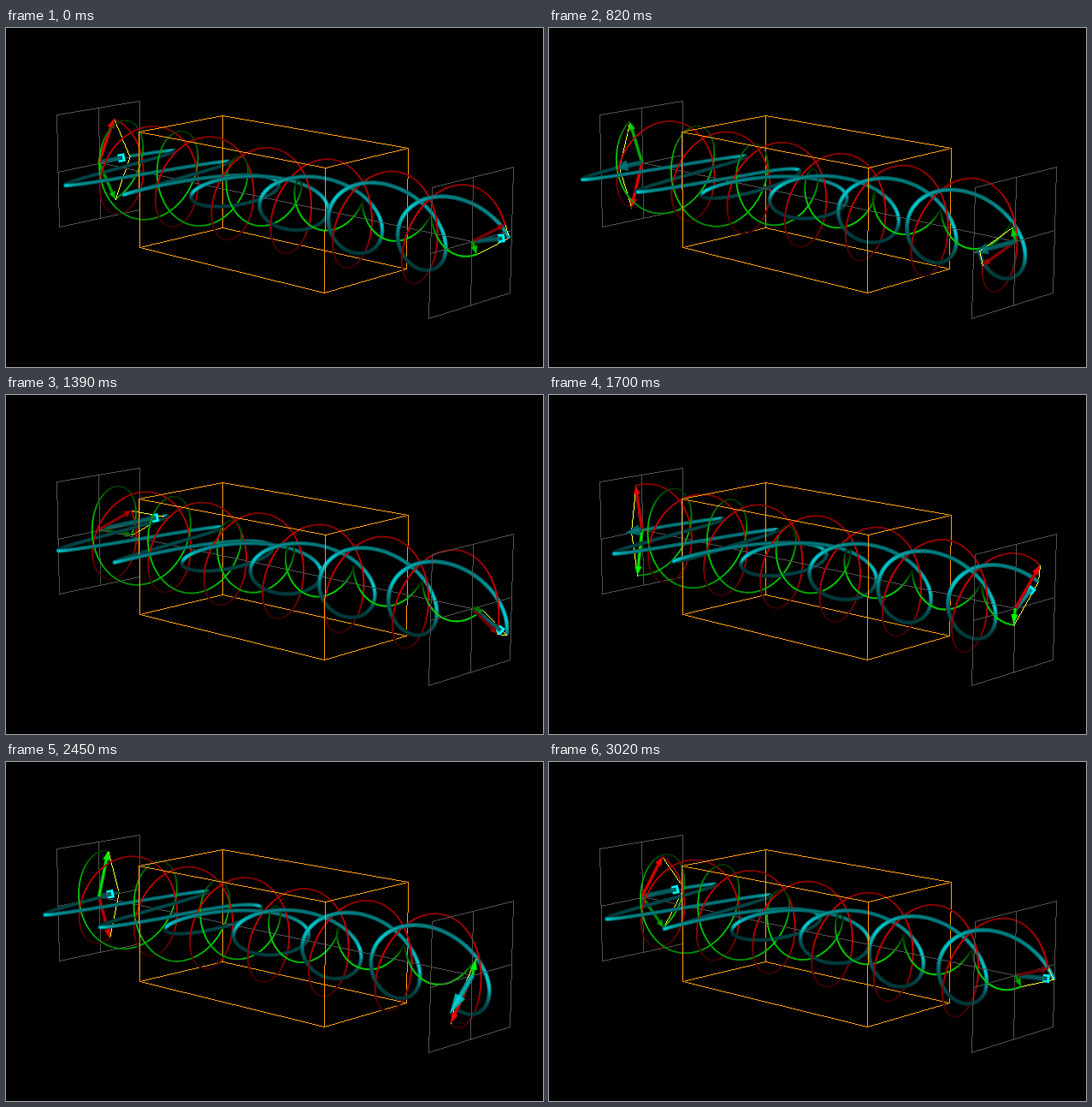
Animation of 628x396 px, one loop 3080 ms. Source, as an HTML page with a canvas:

```html
<!DOCTYPE html>
<html lang="en">
<head>
<meta charset="utf-8">
<title>Circular waves in an absorbing medium</title>
<style>
html, body { margin: 0; width: 628px; height: 396px; overflow: hidden; background: #000; }
canvas { display: block; }
</style>
</head>
<body>
<canvas id="stage" width="628" height="396"></canvas>
<script>
const ctx = document.getElementById('stage').getContext('2d');
const rad = Math.PI / 180;

// Camera: yaw and pitch around the centre of the scene.
const sinYaw = Math.sin(47 * rad), cosYaw = Math.cos(47 * rad);
const sinPitch = Math.sin(13.08 * rad), cosPitch = Math.cos(13.08 * rad);
const SCALE = 71.3, DISTANCE = 34.5, CX = 309.6, CY = 199.5;

// Wave: a runs along the axis, u across, v up. The medium fills the middle half.
const HALF = 4.16, BOX = HALF / 2;
const RADIUS = 0.82, DECAY = 1.18, EXTRA = 55 * rad;
const START = 63 * rad, STEP = 20.85 * rad, TURNS = 6;

const RED = [195, 0, 0], GREEN = [0, 200, 0], CYAN = [0, 205, 210];
const GREY = '#505050', ORANGE = '#ff9a10', YELLOW = '#ffff30';

// Pose durations in ms: mostly short, some held.
const holds = Array(35).fill(60);
for (const i of [0, 2, 4, 7, 9, 12, 14, 17, 20, 21, 26, 29]) holds[i] = 130;
holds[32] = 200;
const LOOP = holds.reduce((sum, h) => sum + h, 0);

function project([a, u, v]) {
  const near = a * cosYaw - u * sinYaw;
  const w = 1 - (near * cosPitch + v * sinPitch) / DISTANCE;
  return {
    x: CX + SCALE * (a * sinYaw + u * cosYaw) / w,
    y: CY + SCALE * (near * sinPitch - v * cosPitch) / w,
    w
  };
}

// Headlight shading: bright where the direction lies across the view.
function light([a, u, v]) {
  const dot = a * cosYaw * cosPitch - u * sinYaw * cosPitch + v * sinPitch;
  const len2 = a * a + u * u + v * v || 1;
  return 0.16 + 0.84 * (1 - dot * dot / len2) ** 1.4;
}

const shade = (rgb, k) => `rgb(${rgb.map(c => Math.min(255, Math.round(c * k)))})`;
const minus = (p, q) => p.map((c, i) => c - q[i]);

function line(p, q, color, width, grow = 0) {
  const len = Math.hypot(q.x - p.x, q.y - p.y) || 1;
  const dx = (q.x - p.x) / len * grow, dy = (q.y - p.y) / len * grow;
  ctx.strokeStyle = color;
  ctx.lineWidth = width;
  ctx.beginPath();
  ctx.moveTo(p.x - dx, p.y - dy);
  ctx.lineTo(q.x + dx, q.y + dy);
  ctx.stroke();
}

function polygon(points, color) {
  ctx.fillStyle = color;
  ctx.beginPath();
  for (const [x, y] of points) ctx.lineTo(x, y);
  ctx.fill();
}

// Hard-edged one-pixel line, cut into pieces so that it sorts by depth with the waves.
function wire(p, q, color, items) {
  const n = Math.max(1, Math.round(Math.max(Math.abs(q.x - p.x), Math.abs(q.y - p.y))));
  const mix = (s, e, f) => s + (e - s) * f;
  for (let from = 0; from <= n; from += 6) {
    const to = Math.min(from + 6, n + 1);
    items.push({
      w: mix(p.w, q.w, (from + to) / 2 / n),
      draw() {
        ctx.fillStyle = color;
        for (let i = from; i < to; i++) {
          ctx.fillRect(Math.round(mix(p.x, q.x, i / n)), Math.round(mix(p.y, q.y, i / n)), 1, 1);
        }
      }
    });
  }
}

const frame = [];
const pin = (x, y, a, u, v) => ({ x, y, w: project([a, u, v]).w });
const rod = (p, q, color) => wire(p, q, color, frame);
const ring = (f, color) => f.forEach((p, i) => rod(p, f[(i + 1) % 4], color));
function face(a, [tl, tr, br, bl]) {
  return [pin(...tl, a, -1, 1), pin(...tr, a, 1, 1), pin(...br, a, 1, -1), pin(...bl, a, -1, -1)];
}

ring(face(-HALF, [[59, 101], [156, 85], [156, 212], [62, 232]]), GREY);
ring(face(HALF, [[498, 186], [593, 162], [589, 309], [494, 339]]), GREY);
rod(pin(108, 93, -HALF, 0, 1), pin(110, 222, -HALF, 0, -1), GREY);
rod(pin(60, 168, -HALF, -1, 0), pin(156, 148, -HALF, 1, 0), GREY);
rod(pin(546, 174, HALF, 0, 1), pin(543, 324, HALF, 0, -1), GREY);
rod(pin(496, 263, HALF, -1, 0), pin(591, 236, HALF, 1, 0), GREY);
rod(pin(109, 157, -HALF, 0, 0), pin(545, 249, HALF, 0, 0), GREY);
const entry = face(-BOX, [[155, 121], [253, 102], [253, 233], [156, 256]]);
const exit = face(BOX, [[373, 163], [470, 140], [468, 281], [372, 309]]);
ring(entry, ORANGE);
ring(exit, ORANGE);
entry.forEach((p, i) => rod(p, exit[i], ORANGE));

function fields(a, phase) {
  const inside = Math.min(1, Math.max(0, (a + BOX) / (2 * BOX)));
  const g = phase - TURNS * Math.PI * (a + HALF) / HALF;
  const r = g - EXTRA * inside;
  const weak = RADIUS * Math.exp(-DECAY * inside);
  const red = [a, RADIUS * Math.cos(r), RADIUS * Math.sin(r)];
  const green = [a, weak * Math.cos(g), -weak * Math.sin(g)];
  return { red, green, sum: [a, red[1] + green[1], red[2] + green[2]] };
}

function tube(points, rgb, width, items) {
  for (let i = 1; i < points.length; i++) {
    const p = project(points[i - 1]), q = project(points[i]);
    const k = light(minus(points[i], points[i - 1]));
    const size = width / p.w;
    items.push({
      w: (p.w + q.w) / 2,
      draw() {
        if (width < 3) return line(p, q, shade(rgb, k), size, 0.4);
        line(p, q, shade(rgb, k * 0.7), size, 0.4);
        line(p, q, shade(rgb, k), size * 0.5, 0.8);
      }
    });
  }
}

function arrow(tip, rgb, thick, back, over, items) {
  const [a, u, v] = tip;
  const len = Math.hypot(u, v) || 1;
  const at = d => project([a, u / len * d, v / len * d]);
  const root = at(0), neck = at(Math.max(0, len - back)), end = at(len + over);
  const k = light([0, u, v]);
  const size = Math.hypot(end.x - neck.x, end.y - neck.y) || 1;
  const dx = (end.x - neck.x) / size, dy = (end.y - neck.y) / size;
  const side = (p, h) => [p.x - dy * h, p.y + dx * h];
  const along = d => ({ x: neck.x + dx * d, y: neck.y + dy * d });
  const away = over > 0 && u / len > 0.75;
  items.push({
    w: (root.w + end.w) / 2 - 0.006,
    draw() {
      line(root, neck, shade(rgb, k * 0.75), thick);
      line(root, neck, shade(rgb, k), thick * 0.45);
      if (away) {
        // Pointing away, only the base of the head shows.
        line(along(-4), along(4), shade(rgb, 1.22), thick * 1.6);
        line(along(-4), along(1), shade(rgb, k), thick * 0.8);
      } else {
        polygon([side(neck, thick * 1.1), [end.x, end.y], side(neck, -thick * 1.1)], shade(rgb, k));
        polygon([side(neck, thick * 0.5), [end.x, end.y], side(neck, -thick * 0.4)], shade(rgb, 1.2 * k));
      }
    }
  });
}

function render(pose) {
  const phase = START + STEP * pose;
  const samples = Array.from({ length: 481 }, (_, i) => fields(HALF * (i / 240 - 1), phase));
  const items = frame.slice();
  tube(samples.map(s => s.red), RED, 1.9, items);
  tube(samples.map(s => s.green), GREEN, 1.9, items);
  tube(samples.map(s => s.sum), CYAN, 4.6, items);

  for (const s of [samples[0], samples[480]]) {
    arrow(s.red, [245, 0, 0], 3.8, 0.16, 0, items);
    arrow(s.green, [0, 235, 0], 3.8, 0.16, 0, items);
    arrow(s.sum, CYAN, 6, 0.2, 0.14, items);
    for (const part of [s.red, s.green]) wire(project(part), project(s.sum), YELLOW, items);
  }

  items.sort((p, q) => q.w - p.w);
  ctx.fillStyle = '#000';
  ctx.fillRect(0, 0, 628, 396);
  for (const item of items) item.draw();
}

let shown = -1;
function show(time) {
  let rest = time % LOOP, pose = 0;
  while (rest >= holds[pose]) rest -= holds[pose++];
  if (pose !== shown) render(shown = pose);
}

const begin = performance.now();
(function tick() {
  show(performance.now() - begin);
  requestAnimationFrame(tick);
})();
</script>
</body>
</html>
```
